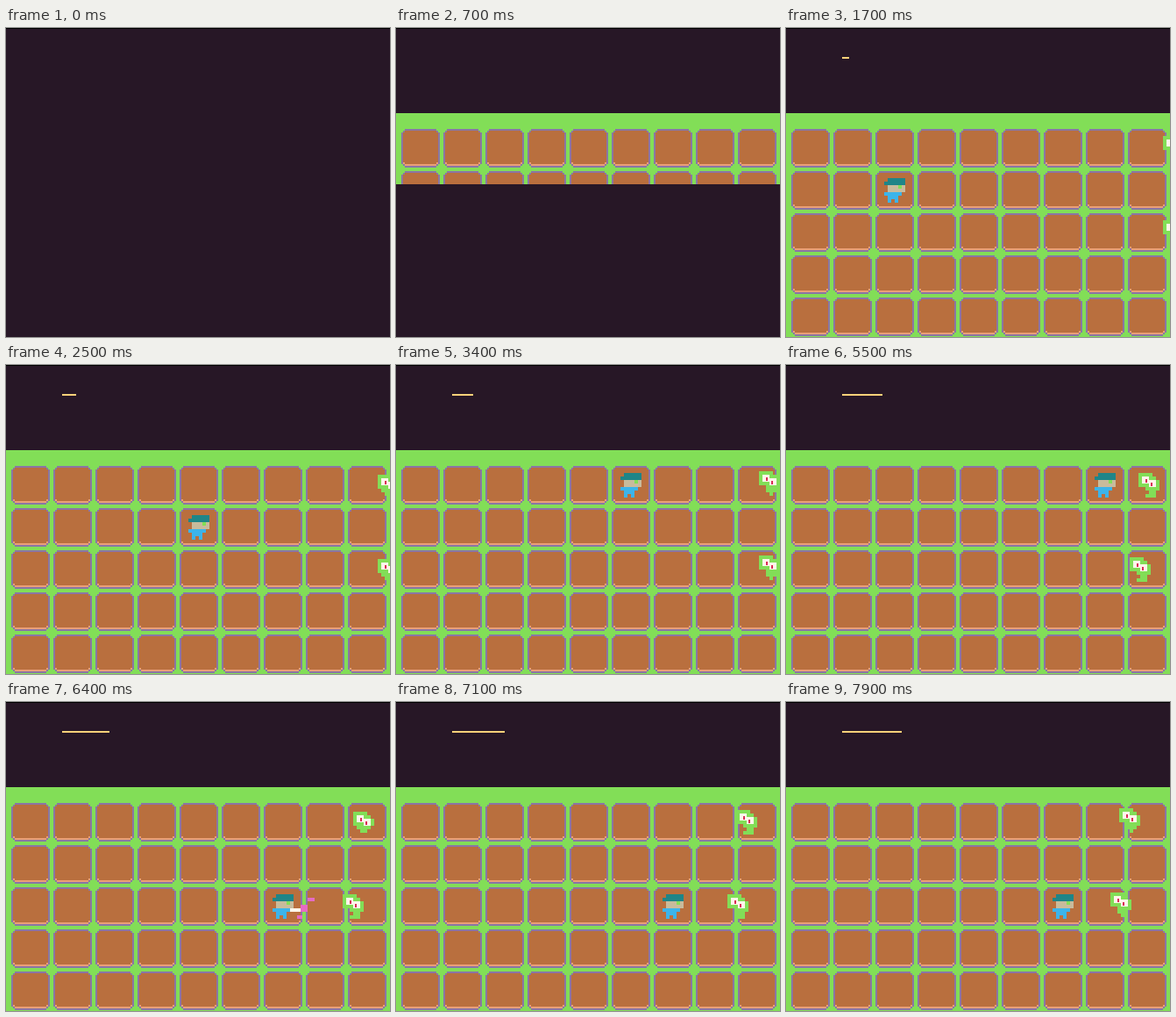
Write an HTML page with a canvas that moves like this. It is 438 px wide and 352 px high and loops after 8 s.

```html
<!DOCTYPE html>
<html lang="en">
<head>
<meta charset="utf-8">
<title>Grid battle</title>
<style>
html, body { margin: 0; width: 100%; height: 100%; overflow: hidden; background: #271726; }
canvas { display: block; }
</style>
</head>
<body>
<canvas id="stage" width="438" height="352"></canvas>
<script>
const ctx = document.getElementById('stage').getContext('2d');
const LOOP = 8000, CELL = 48, PX = 4;
const NIGHT = '#271726', GRASS = '#82de57', EDGE = '#8a76a4', SOIL = '#b96f3e',
      PEACH = '#ea9f76', GOLD = '#fdd179', WHITE = '#fff6ea', PINK = '#e56bc4';

const INK = { T: '#1f8588', S: '#c8bb9c', E: '#82de57', B: '#3cb4ea', G: '#82de57', W: WHITE };

const HERO = ['.TTTTT', 'TTTTTT', '.SSSES', '.SSSSS', 'BBBBB.', '.BBB..', '.B.B..'];
const FACE = ['GGGG..', 'GWWGG.', 'GWWWWG', 'GGGWWG'];
const LEGS = {
  up: ['..GGGG', '..GGG.', '...G..'],
  mid: ['..GGGG', '...GG.', '..GGG.'],
  low: ['.GGGG.', '..GG..']
};

// time, column, row
const STEPS = [[900, 1, 1], [1500, 2, 1], [2100, 3, 1], [2500, 4, 1], [2800, 4, 0],
  [3200, 5, 0], [3700, 6, 0], [4000, 7, 0], [5700, 7, 1], [5900, 7, 2], [6100, 6, 2]];

function box(color, x, y, w, h) {
  ctx.fillStyle = color;
  ctx.fillRect(x, y, w, h);
}

function sprite(rows, x, y) {
  rows.forEach((row, j) => [...row].forEach((key, i) => {
    if (INK[key]) box(INK[key], x + i * PX, y + j * PX, PX, PX);
  }));
}

function tile(x, y) {
  box(EDGE, x + 4, y, 36, 44);
  box(EDGE, x + 2, y + 2, 40, 40);
  box(EDGE, x, y + 4, 44, 36);
  box(SOIL, x + 4, y + 2, 36, 38);
  box(SOIL, x + 2, y + 4, 40, 34);
  box(PEACH, x + 4, y + 40, 36, 2);
  box(PEACH, x + 2, y + 38, 2, 2);
  box(PEACH, x + 40, y + 38, 2, 2);
}

function field() {
  box(GRASS, 0, 97, 438, 255);
  for (let r = 0; r < 5; r++)
    for (let c = 0; c < 9; c++) tile(6 + c * CELL, 115 + r * CELL);
}

function enemy(t, x, row, lag) {
  const bob = Math.round(0.75 * Math.cos((t - 3400 - lag) / 643 * 2 * Math.PI));
  const pose = bob > 0 ? 'up' : bob < 0 ? 'low' : 'mid';
  if (pose === 'low') x += 2;
  const y = 123 + row * CELL - 2 * bob;
  sprite(FACE.concat(LEGS[pose]), x, y);
  box('#d92c55', x + 8, y + 7, 2, 4);
  box('#d92c55', x + 14, y + 11, 2, 4);
}

function sparks(x, y, spots) {
  for (const [dx, dy, w, h] of spots) box(PINK, x + dx, y + dy, w, h);
}

function draw(t) {
  box(NIGHT, 0, 0, 438, 352);
  box('#000', 0, 0, 438, 1);
  if (t < 700) return;
  field();
  if (t < 900) return box(NIGHT, 0, 178, 438, 174);

  const ticks = t < 1400 ? +(t >= 1100) : Math.floor((t - 806) / 204);
  box(GOLD, 64, 33, 2 * ticks, 2);

  const left = 438 - 2 * ticks;
  enemy(t, left + (t < 4500 ? 0 : 10), 0, 60);
  enemy(t, left, 2, 0);

  const [, col, row] = STEPS.filter(s => s[0] <= t).pop();
  const x = 16 + col * CELL, y = 123 + row * CELL;
  sprite(HERO, x, y);

  const long = t >= 4400 && t < 4500 || t >= 6300 && t < 6400;
  const short = t >= 4300 && t < 4600 || t >= 6300 && t < 6500;
  if (short) box(WHITE, x + 20, y + 16, long ? 35 : 12, 4);
  if (long && row === 0)
    sparks(x, y, [[56, 0, 4, 4], [72, 0, 4, 4], [52, 20, 4, 4], [66, 24, 4, 4]]);
  if (t >= 6400 && t < 6500)
    sparks(x, y, [[32, 12, 8, 8], [40, 4, 8, 4], [28, 24, 6, 4]]);
}

function frame(now) {
  draw(now % LOOP);
  requestAnimationFrame(frame);
}
draw(0);
requestAnimationFrame(frame);
</script>
</body>
</html>
```
